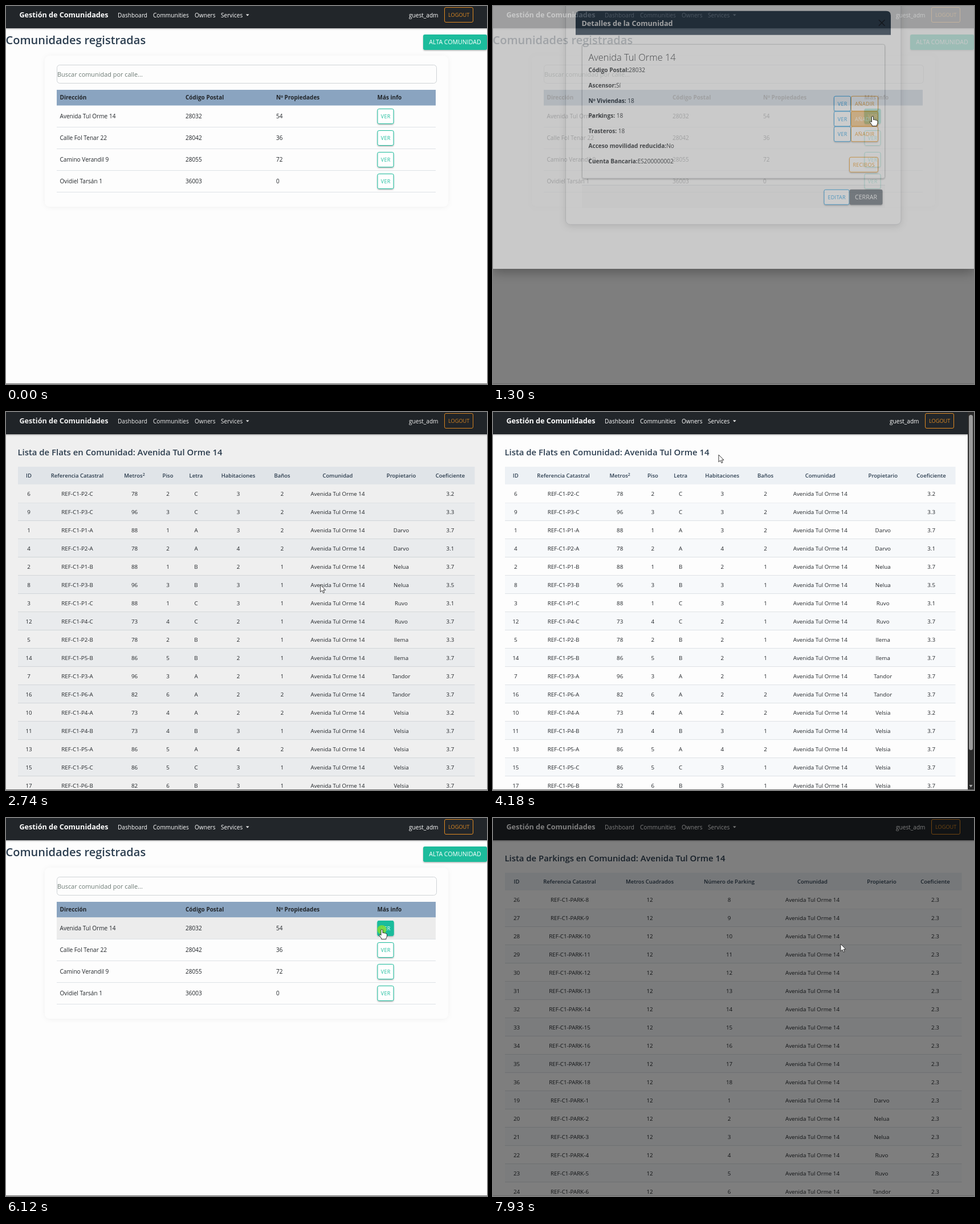
An HTML page that plays this animation: 844x663 px, repeating every 7.99 s.

```html
<!DOCTYPE html>
<html lang="es">
<head>
<meta charset="utf-8">
<title>Gestión de Comunidades</title>
<style>
html, body { margin: 0; width: 100%; height: 100%; overflow: hidden; background: #fdfdfd; }
svg { display: block; width: 100vw; height: 100vh; }
text { font-family: "Open Sans", "Noto Sans", sans-serif; white-space: pre; }
</style>
</head>
<body>
<svg id="stage" viewBox="0 0 844 663"></svg>
<script>
const LOOP = 7990;
const TEAL = '#1abc9c', NAVY = '#2c3e50', INK = '#212529', BLUE = '#2ea3e6', ORANGE = '#f0a02f';
const STREET = 'Avenida Tul Orme 14';

// ---------- markup helpers ----------
const rect = (x, y, w, h, fill, more = '') =>
  `<rect x="${x}" y="${y}" width="${w}" height="${h}" fill="${fill}" ${more}/>`;
const line = (x1, x2, y, color = '#dee2e6') => rect(x1, y, x2 - x1, 1, color);
// y is the middle of the capitals
const text = (x, y, str, size, { fill = INK, weight = 400, at = 'start', more = '' } = {}) =>
  `<text x="${x}" y="${y + size * 0.357}" font-size="${size}" fill="${fill}" font-weight="${weight}" text-anchor="${at}" ${more}>${str}</text>`;
const group = (id, body, more = '') => `<g id="${id}" ${more}>${body}</g>`;

const hot = [];
function button(page, x, y, w, label, color) {
  const id = 'b' + hot.length;
  hot.push({ id, page, x, y, w, h: 27, color });
  return rect(x + .5, y + .5, w - 1, 26, '#fff', `rx="2.5" stroke="${color}" filter="url(#low)"`) +
    rect(x, y, w, 27, color, `id="${id}" rx="3" opacity="0"`) +
    text(x + w / 2 + .2, y + 14, label, 9, { fill: color, at: 'middle', more: `id="${id}t" letter-spacing=".3"` });
}
const solid = (x, y, w, label, color) =>
  rect(x, y, w, 27, color, 'rx="3" filter="url(#low)"') +
  text(x + w / 2, y + 13, label, 10.6, { fill: '#fff', at: 'middle' });

// ---------- navigation bar ----------
const link = (x, s) => text(x, 16, s, 10.1, { fill: '#fff' });
const nav = rect(-20, 0, 884, 39, INK, 'filter="url(#low)"') +
  text(23.5, 16, 'Gestión de Comunidades', 12.6, { fill: '#fff', weight: 700 }) +
  link(196, 'Dashboard') + link(258, 'Communities') + link(331, 'Owners') + link(377, 'Services') +
  '<path d="M421 14.5h5.6l-2.8 3z" fill="#fff"/>' +
  group('navRight', link(707, 'guest_adm') +
    rect(769.5, 2.5, 50, 26, 'none', 'rx="2.5" stroke="#e08a22"') +
    text(794.7, 16, 'LOGOUT', 9.2, { fill: '#e08a22', at: 'middle' }));

// ---------- community list ----------
const places = [
  [STREET, 28032, 54], ['Calle Fol Tenar 22', 28042, 36],
  ['Camino Verandil 9', 28055, 72], ['Ovidiel Tarsán 1', 36003, 0]
];
const listX = [94.5, 315, 474, 651.5];
const list = text(-.5, 59.5, 'Comunidades registradas', 20, { fill: NAVY, weight: 600 }) +
  solid(732, 50, 112, 'ALTA COMUNIDAD', TEAL) +
  rect(68, 87, 708, 265, '#fdfdfd', 'rx="9" filter="url(#faint)"') +
  rect(89.5, 103.5, 666, 32, '#fdfdfd', 'rx="5" stroke="#cfd3d6"') +
  text(90, 120.5, 'Buscar comunidad por calle...', 10.9, { fill: '#6c7a74' }) +
  rect(89, 147, 665, 27.5, '#8aa4c0') +
  ['Dirección', 'Código Postal', 'Nº Propiedades', 'Más info']
    .map((s, i) => text(listX[i], 160.5, s, 10, { weight: 700 })).join('') +
  places.map((p, i) => {
    const y = 174.5 + 38 * i;
    return rect(89, y, 665, 37.5, '#ececec', `id="row${i}" opacity="0"`) +
      line(89, 754, y + 37.5) +
      p.map((s, c) => text(listX[c], y + 18.5, s, 10.1)).join('') +
      button('list', 651.5, y + 5.5, 29, 'VER', TEAL);
  }).join('');

// ---------- data tables ----------
const edge = (x, k) => 21 + (x - 21) * k;
function table(title, heads, xs, rows, k = 1) {
  const right = edge(822.5, k), put = (c, y, s, o = {}) =>
    text(edge(xs[c], k), y, s, o.weight ? 9.5 : 9.8, { at: 'middle', ...o });
  return text(20.5, 71, `Lista de ${title} en Comunidad: ${STREET}`, 14.9, { fill: NAVY, weight: 600 }) +
    rect(21, 96, right - 21, 31, '#edf1f5') +
    heads.map((s, c) => put(c, 112, s, { weight: 600, fill: NAVY })).join('') +
    rows.map((row, i) => {
      const y = 127.5 + 31.98 * i;
      return (i % 2 ? rect(21, y, right - 21, 32, '#f7f9fb') : '') + line(21, right, Math.round(y + 31)) +
        row.map((s, c) => put(c, y + 16.5, s)).join('');
    }).join('');
}

const owners = ['', 'Darvo', 'Nelua', 'Ruvo', 'Ilema', 'Tandor', 'Velsia'];
const meters = [88, 78, 96, 73, 86, 82];
// id, rooms+baths, owner, coefficient
const flats = ('6 32 0 3.2,9 32 0 3.3,1 32 1 3.7,4 42 1 3.1,2 21 2 3.7,8 31 2 3.5,3 31 3 3.1,12 21 3 3.7,' +
  '5 21 4 3.3,14 21 4 3.7,7 21 5 3.7,16 22 5 3.7,10 22 6 3.2,11 31 6 3.7,13 42 6 3.7,15 31 6 3.7,17 31 6 3.7,18 31 6 3.7')
  .split(',').map(s => {
    const [id, rooms, who, share] = s.split(' ');
    const floor = Math.ceil(id / 3), door = 'ABC'[(id - 1) % 3];
    return [id, `REF-C1-P${floor}-${door}`, meters[floor - 1], floor, door, rooms[0], rooms[1], STREET, owners[who], share];
  });
const flatTable = k => table('Flats',
  ['ID', 'Referencia Catastral', 'Metros<tspan dy="-3" font-size="7">2</tspan>', 'Piso', 'Letra', 'Habitaciones',
    'Baños', 'Comunidad', 'Propietario', 'Coeficiente'],
  [40, 125, 225.5, 284, 333.5, 407.5, 484.5, 582, 693.5, 779.5], flats, k);

const parking = Array.from({ length: 17 }, (_, i) => {
  const n = i < 11 ? i + 8 : i - 10;
  return [n + 18, 'REF-C1-PARK-' + n, 12, n, STREET, owners[i < 11 ? 0 : +'122335'[i - 11]], '2.3'];
});
const parkTable = table('Parkings',
  ['ID', 'Referencia Catastral', 'Metros Cuadrados', 'Número de Parking', 'Comunidad', 'Propietario', 'Coeficiente'],
  [41.5, 134.5, 275, 414.5, 560.5, 682, 776], parking);

// ---------- details dialog ----------
const facts = [['Código Postal:', '28032'], ['Ascensor:', 'Sí'], ['Nº Viviendas:', ' 18'], ['Parkings:', ' 18'],
  ['Trasteros:', ' 18'], ['Acceso movilidad reducida:', 'No'], ['Cuenta Bancaria:', 'ES200000002']];
const card = rect(127.5, 11.5, 588.5, 392, '#fdfdfd', 'rx="8" stroke="#cdcfd1" filter="url(#soft)"') +
  `<path d="M145 71V37q0-8 8-8H690q8 0 8 8V71z" fill="${NAVY}"/>` +
  text(155.5, 50.5, 'Detalles de la Comunidad', 12.6, { fill: '#fff', weight: 700 }) +
  '<path d="M677 44.5l10.5 10.5m0-10.5L677 55" stroke="#151b22" stroke-width="1.4"/>' +
  rect(156.5, 87.5, 531, 235, '#fdfdfd', 'rx="3" stroke="#c4c6c8" filter="url(#low)"') +
  text(167.5, 110.5, STREET, 16.4, { weight: 300 }) +
  facts.map(([k, v], i) => text(167.5, 133 + 26.6 * i, `${k}<tspan font-weight="400">${v}</tspan>`, 10.1, { weight: 700 })).join('') +
  [178, 204.7, 231.4].map(y => button('modal', 598, y, 30, 'VER', BLUE) + button('modal', 628, y, 48, 'AÑADIR', ORANGE)).join('') +
  button('modal', 625, 285, 51, 'RECIBOS', ORANGE) +
  rect(156, 334, 532, 40, '#f8f8f8') + line(156, 688, 334) +
  button('modal', 580.5, 342, 45, 'EDITAR', BLUE) + solid(625.5, 342, 58, 'CERRAR', '#6c757d');

const shadow = (id, dy, blur, alpha) =>
  `<filter id="${id}" x="-20%" y="-30%" width="140%" height="180%"><feDropShadow dx="0" dy="${dy}" stdDeviation="${blur}" flood-opacity="${alpha}"/></filter>`;

stage.innerHTML = '<defs>' + shadow('low', 1.3, 1.2, .3) + shadow('faint', 1, 4, .05) +
    shadow('soft', 3, 6, .14) + shadow('deep', 6, 10, .5) + '</defs>' +
  rect(0, 0, 844, 663, '#fdfdfd') +
  group('page', group('list', list) + group('wide', flatTable(1)) + group('narrow', flatTable(790 / 801)) +
    group('park', parkTable) + nav) +
  group('bar', rect(833, 0, 11, 663, '#2b2b2b') + rect(835, 5, 7, 588, '#9c9c9c', 'id="thumb" rx="3.5"') +
    '<path d="M835.5 654h6l-3 4.5z" fill="#a8a8a8"/>') +
  rect(0, 0, 844, 663, '#000', 'id="shade"') +
  group('modal', rect(0, -40, 844, 501, '#fafafa', 'filter="url(#deep)"') + group('card', card)) +
  rect(0, 662, 844, 1, '#6a6a6a') +
  '<circle id="dot" r="8" fill="#7fdc32" opacity=".85"/>' +
  group('cursor',
    '<path id="arrow" d="M0 0V12.6L3 9.9 5 14.4 7 13.5 5.1 9.2H9z"/>' +
    '<path id="hand" d="M-1.5 1Q-1.5-.5 0-.5T1.5 1V5.5Q4 4.6 4.4 6 6.6 5.4 7 6.8 9 6.4 9 8.2V11Q9 13 7.5 14.5V16.5H-.8V15L-4.6 9.8Q-4.6 7.6-2.8 8.4L-1.5 9.8z"/>',
    'fill="#fff" stroke="#222" stroke-width=".9" stroke-linejoin="round"');

// ---------- motion ----------
const $ = id => document.getElementById(id);
const clamp = v => Math.min(1, Math.max(0, v));
const ramp = (t, from, span) => clamp((t - from) / span);
const smooth = p => p * p * (3 - 2 * p);
const show = (id, on) => $(id).setAttribute('display', on ? 'inline' : 'none');
const set = (id, name, v) => $(id).setAttribute(name, v);

// time, x, y; the first move is already under way when the pointer appears
const path = [
  [-620, 948, 1034], [760, 666, 194], [1330, 666, 194], [1790, 648, 212], [1960, 612, 193], [2600, 612, 193],
  [2833, 520, 361], [3760, 520, 361], [4180, 396, 75], [4670, 394, 149], [4900, 394, 149],
  [5320, 289, 17], [5420, 289, 17], [5960, 659.5, 196], [6330, 659.5, 196], [6727, 500, 263], [7400, 611, 226], [7720, 610, 221]
];
function cursorAt(t) {
  let i = 0;
  while (i < path.length - 2 && t > path[i + 1][0]) i++;
  const [t0, x0, y0] = path[i], [t1, x1, y1] = path[i + 1];
  const p = smooth(ramp(t, t0, t1 - t0));
  return [x0 + (x1 - x0) * p, y0 + (y1 - y0) * p];
}

const pageAt = t => t < 2465 ? 'list' : t < 5400 ? 'flats' : t < 7925 ? 'list' : 'park';
const opens = [1180, 6305];
function modalAt(t) {
  const start = opens[t < 5400 ? 0 : 1];
  if (t < start || pageAt(t) !== 'list') return { alpha: 0, dy: -50 };
  return { alpha: ramp(t, start, 200), dy: -50 * (1 - ramp(t, start, 300)) ** 1.75 };
}
function shadeAt(t) {
  if (t < 5400) return .5 * (ramp(t, 1050, 150) - ramp(t, 2607, 150));
  return .5 * ramp(t, 6175, 150);
}
function isOver(b, t) {
  if (t < 70 || pageAt(t) !== 'list') return false;
  const [x, y] = cursorAt(t), { alpha, dy } = modalAt(t), inModal = b.page === 'modal';
  if (inModal ? alpha < .25 : alpha > 0) return false;
  const top = b.y + (inModal ? dy : 0);
  return x > b.x && x < b.x + b.w && y > top && y < top + b.h;
}
// averaging the recent past gives a linear hover fade
function hoverAt(b, t) {
  let sum = 0;
  for (let d = 0; d < 140; d += 10) sum += isOver(b, t - d);
  return sum / 14;
}
const clicks = [[1015, 100], [2395, 70], [5320, 80], [6090, 100], [7855, 70]];

function draw(t) {
  const page = pageAt(t), modal = modalAt(t), [x, y] = cursorAt(t);
  const bar = page === 'flats' && t >= 2800;
  const roll = bar ? smooth(ramp(t, 2880, 330)) - smooth(ramp(t, 3740, 280)) : 0;

  show('list', page === 'list');
  show('wide', page === 'flats' && !bar);
  show('narrow', bar);
  show('park', page === 'park');
  show('bar', bar);
  set('page', 'transform', `translate(0 ${-64 * roll})`);
  set('navRight', 'transform', `translate(${bar ? -11 : 0} 0)`);
  set('thumb', 'y', 5 + 57 * roll);

  set('shade', 'opacity', shadeAt(t));
  show('modal', modal.alpha > 0);
  set('modal', 'opacity', modal.alpha);
  set('card', 'transform', `translate(0 ${modal.dy})`);

  places.forEach((_, i) => {
    const top = 174.5 + 38 * i;
    set('row' + i, 'opacity', t >= 70 && !shadeAt(t) && x > 89 && x < 754 && y > top && y < top + 38 ? 1 : 0);
  });
  for (const b of hot) {
    const pressed = b.id === 'b0' && modal.alpha > 0 && modal.alpha < 1;
    const h = pressed ? 1 : hoverAt(b, t);
    set(b.id, 'opacity', h);
    set(b.id + 't', 'fill', h > .5 ? '#fff' : b.color);
  }

  const onLink = y < 26 && x > 258 && x < 320;
  const hand = onLink || hot.some(b => isOver(b, t));
  show('cursor', t >= 70);
  show('hand', hand);
  show('arrow', !hand);
  set('cursor', 'transform', `translate(${x} ${y})`);
  show('dot', clicks.some(([c, d]) => t >= c && t < c + d));
  set('dot', 'cx', x);
  set('dot', 'cy', y);
}

const begin = performance.now();
function tick() {
  draw((performance.now() - begin) % LOOP);
  requestAnimationFrame(tick);
}
tick();
</script>
</body>
</html>
```
